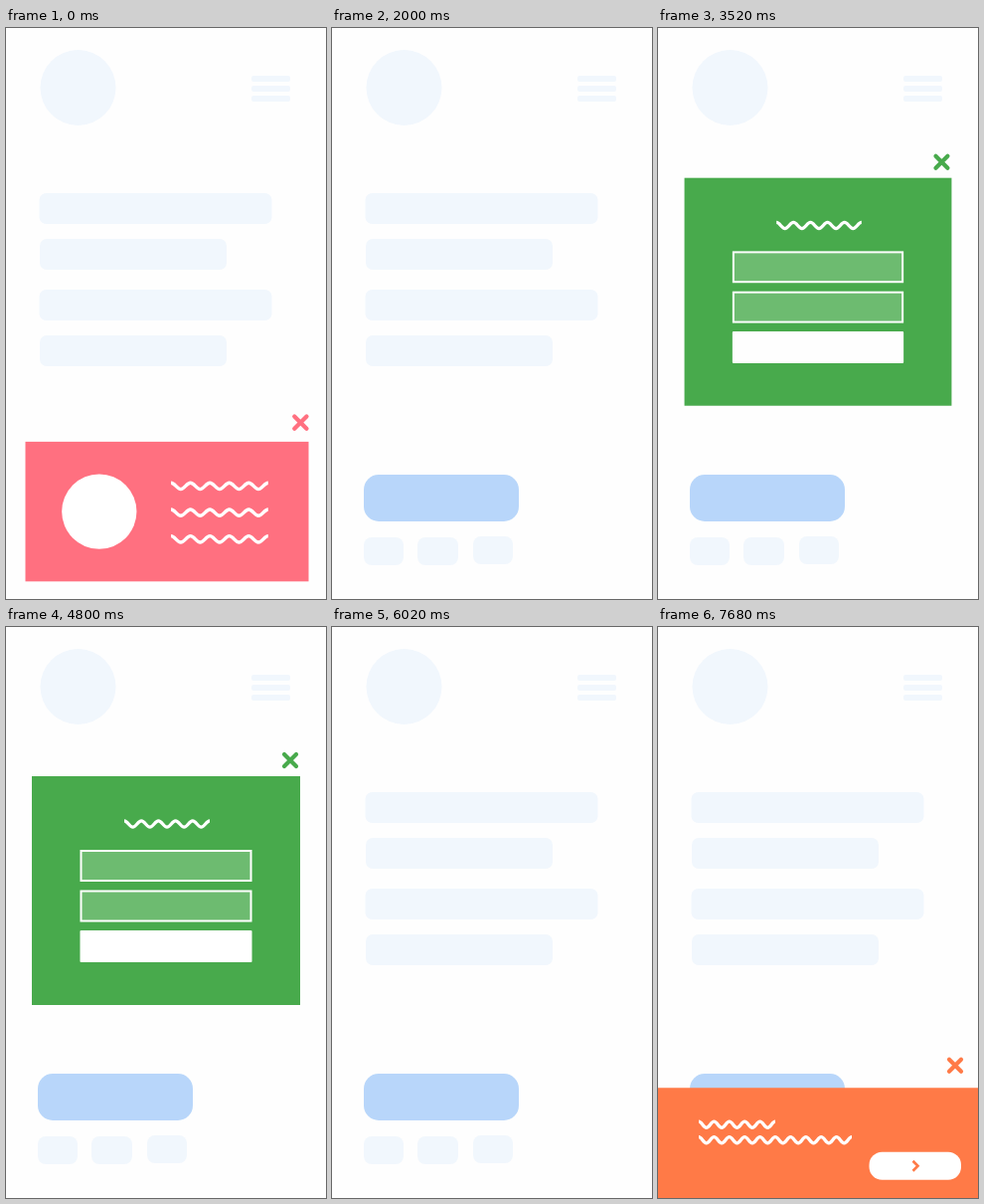
Write an HTML page that moves like this. It is 322x574 px and loops after 8 s.

```html
<!DOCTYPE html>
<html>
<head>
<meta charset="utf-8">
<style>
html, body { margin: 0; width: 100%; height: 100%; overflow: hidden; background: #fefefe; }
svg { display: block; width: 100%; height: 100%; }
.wave { fill: none; stroke: #fff; stroke-width: 3.3; }
.cross { fill: none; stroke-width: 4.2; stroke-linecap: round; }
</style>
</head>
<body>
<svg viewBox="0 0 322 574">
  <g fill="#f1f7fd">
    <circle cx="72.5" cy="60" r="38"/>
    <rect x="247" y="48" width="39" height="6" rx="2"/>
    <rect x="247" y="58" width="39" height="6" rx="2"/>
    <rect x="247" y="68" width="39" height="6" rx="2"/>
    <rect x="33.5" y="166" width="234" height="31" rx="7"/>
    <rect x="34" y="212" width="188" height="31" rx="7"/>
    <rect x="33.5" y="263" width="234" height="31" rx="7"/>
    <rect x="34" y="309" width="188" height="31" rx="7"/>
    <rect x="32" y="512" width="40" height="28" rx="8"/>
    <rect x="86" y="512" width="41" height="28" rx="8"/>
    <rect x="142" y="511" width="40" height="28" rx="8"/>
    <rect x="32" y="449" width="156" height="47" rx="15" fill="#b8d6fa"/>
  </g>
  <g id="red">
    <path class="cross" stroke="#ff7080" d="M288 393l12 12m0-12l-12 12"/>
    <rect x="22" y="418" width="280" height="138" fill="#ff7080"/>
    <circle cx="95" cy="487" r="37" fill="#fff"/>
    <path class="wave" data-wave="166 461.8 19.2 5"/>
    <path class="wave" data-wave="166 488 19.2 5"/>
    <path class="wave" data-wave="166 514.2 19.2 5"/>
  </g>
  <g id="green">
    <path class="cross" stroke="#48aa4c" d="M280 128l12 12m0-12l-12 12"/>
    <rect x="26" y="150" width="270" height="230" fill="#48aa4c"/>
    <path class="wave" data-wave="119 198 17.2 5"/>
    <g fill="#fff" fill-opacity=".2" stroke="#fff" stroke-width="2">
      <rect x="75.5" y="225" width="171" height="30"/>
      <rect x="75.5" y="265.5" width="171" height="30"/>
    </g>
    <rect x="74.5" y="305" width="173" height="32" rx="1" fill="#fff"/>
  </g>
  <g id="orange">
    <path class="cross" stroke="#ff7a47" d="M293 435l12 12m0-12l-12 12"/>
    <rect y="463.5" width="322" height="170" fill="#ff7a47"/>
    <path class="wave" data-wave="41 500.5 15.4 5"/>
    <path class="wave" data-wave="41 516 15.4 10"/>
    <rect x="212.5" y="528" width="92.5" height="28" rx="13" fill="#fff"/>
    <path d="M256.5 537l5 5-5 5" fill="none" stroke="#ff7a47" stroke-width="2.6"/>
  </g>
</svg>
<script>
const LOOP = 8000, POP = 800, EXIT = 400;
const $ = id => document.getElementById(id);

for (const el of document.querySelectorAll('[data-wave]')) {
  const [x, y, period, count] = el.dataset.wave.split(' ').map(Number);
  const h = period / 2, c = h * 0.4, a = 6.2;
  const down = `c${c} 0 ${h - c} ${a} ${h} ${a}`;
  const up = `c${c} 0 ${h - c} ${-a} ${h} ${-a}`;
  el.setAttribute('d', `M${x} ${y - a / 2}` + (down + up).repeat(count));
}

function elastic(t) {
  if (t <= 0) return 0;
  if (t >= 1) return 1;
  return 1 + 2 ** (-10 * t) * Math.sin((t - 0.15) * 2 * Math.PI / 0.6);
}

function popup(id, t, enter, exit, cx, cy) {
  const out = Math.min(1, Math.max(0, (t - exit) / EXIT));
  const s = elastic((t - enter) / POP) * (1 - out ** 3);
  const el = $(id);
  el.setAttribute('transform', `translate(${cx} ${cy}) scale(${s}) translate(${-cx} ${-cy})`);
  el.setAttribute('opacity', Math.min(1, s));
  el.style.display = s > 0 ? '' : 'none';
}

function draw(t) {
  popup('red', t, -123, 1600, 162, 537);
  popup('green', t, 2964, 4800, 161, 312);
  const rise = elastic((t - 6950) / POP);
  $('orange').setAttribute('transform', `translate(0 ${141 * (1 - rise)})`);
  $('orange').style.display = rise > 0 ? '' : 'none';
}

const start = performance.now();
function frame() {
  draw((performance.now() - start) % LOOP);
  requestAnimationFrame(frame);
}
frame();
</script>
</body>
</html>
```
